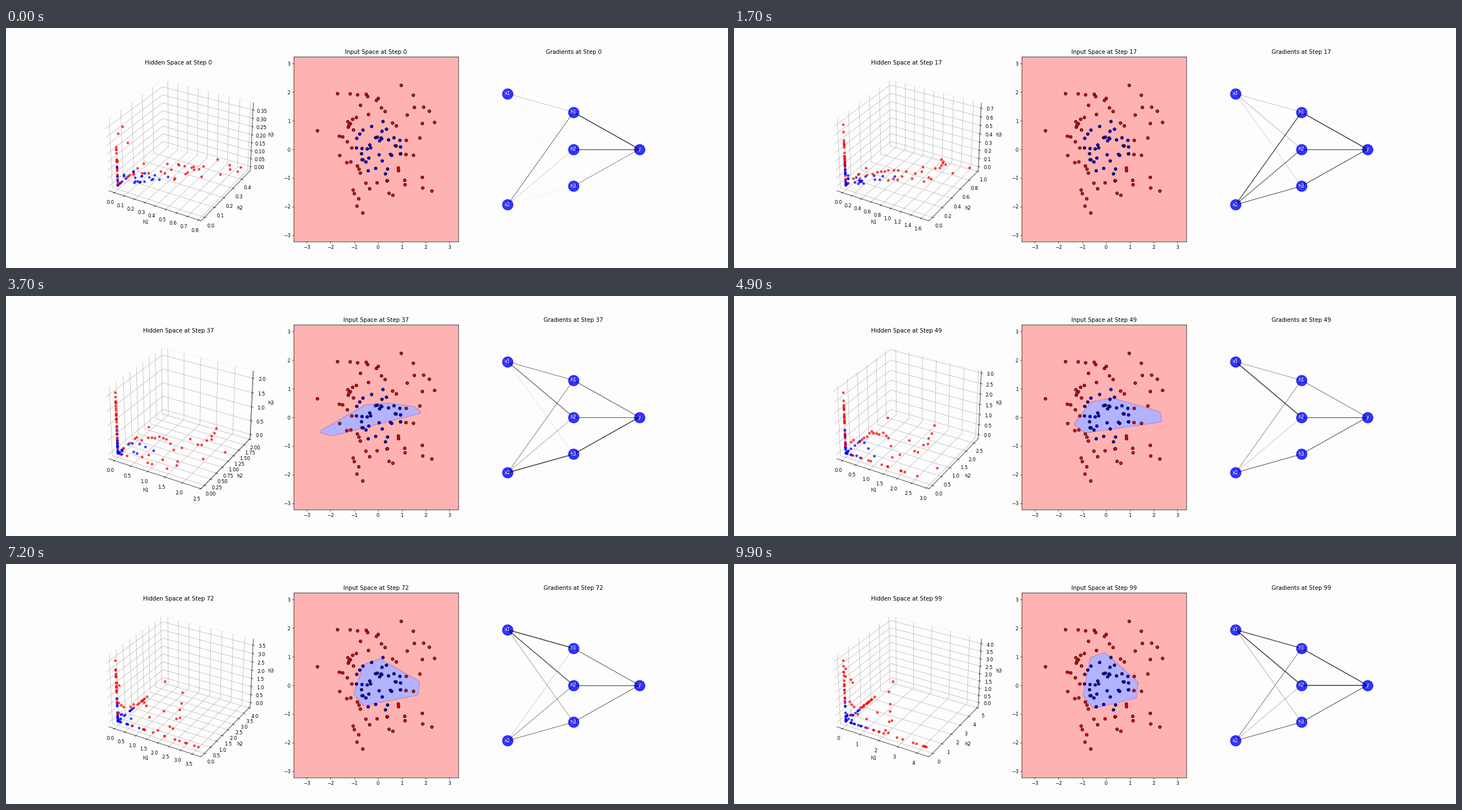
A matplotlib script for the animation above (10000 ms loop, 1280 px wide and 427 px high).

```python
import numpy as np
import matplotlib.pyplot as plt
from matplotlib.animation import FuncAnimation

FRAMES = 100
STEPS_PER_FRAME = 10
RATE = 0.1
DPI = 61
BACK = "#fdfdfd"


def make_data(count=100):
    np.random.seed(0)
    points = np.random.randn(count, 2)
    outer = (points ** 2).sum(axis=1, keepdims=True) > 1
    return points, outer.astype(float)


def forward(points, params):
    w1, b1, w2, b2 = params
    hidden = np.maximum(points @ w1 + b1, 0)
    prob = 1 / (1 + np.exp(-(hidden @ w2 + b2)))
    return hidden, prob


def gradients(points, target, params):
    hidden, prob = forward(points, params)
    d_out = (prob - target) / len(points)
    d_hid = (d_out @ params[2].T) * (hidden > 0)
    return [points.T @ d_hid, d_hid.sum(axis=0),
            hidden.T @ d_out, d_out.sum(axis=0)]


def train(points, target):
    """Return (params, gradients) of a 2-3-1 ReLU network for every frame."""
    np.random.seed(0)
    params = [np.random.randn(2, 3) * 0.1, np.zeros(3),
              np.random.randn(3, 1) * 0.1, np.zeros(1)]
    history = []
    # one extra block of steps comes before the first picture
    for _ in range(FRAMES + 1):
        for _ in range(STEPS_PER_FRAME):
            grads = gradients(points, target, params)
            params = [p - RATE * g for p, g in zip(params, grads)]
        history.append((params, grads))
    return history[1:]


X, Y = make_data()
labels = Y.ravel()
history = train(X, Y)

lo, hi = X.min(axis=0) - 1, X.max(axis=0) + 1
gx, gy = np.meshgrid(np.linspace(lo[0], hi[0], 100),
                     np.linspace(lo[1], hi[1], 100))
grid = np.column_stack([gx.ravel(), gy.ravel()])

fig = plt.figure(figsize=(1280 / DPI, 427 / DPI), dpi=DPI, facecolor=BACK)
ax_hidden = fig.add_subplot(131, projection="3d", facecolor=BACK)
ax_input = fig.add_subplot(132)
ax_net = fig.add_subplot(133)

# input space
ax_input.scatter(X[:, 0], X[:, 1], c=labels, cmap="bwr", edgecolors="k")
ax_input.set_xlim(lo[0], hi[0])
ax_input.set_ylim(lo[1], hi[1])
regions = []

# network graph
inputs = [(0.1, 0.8), (0.1, 0.2)]
hiddens = [(0.5, 0.7), (0.5, 0.5), (0.5, 0.3)]
output = (0.9, 0.5)
ax_net.set_xlim(0, 1)
ax_net.set_ylim(0, 1)
ax_net.axis("off")
nodes = inputs + hiddens + [output]
for (nx, ny), name in zip(nodes, ["x1", "x2", "h1", "h2", "h3", "y"]):
    ax_net.scatter(nx, ny, s=500, color="blue", alpha=0.8)
    ax_net.text(nx, ny, name, color="white", ha="center", va="center")


def link(a, b):
    return ax_net.plot([a[0], b[0]], [a[1], b[1]], color="k", alpha=0.7)[0]


edges = [link(a, b) for a in inputs for b in hiddens]
edges += [link(h, output) for h in hiddens]


def draw_hidden(step, params):
    hidden, _ = forward(X, params)
    ax_hidden.clear()
    for axis in (ax_hidden.xaxis, ax_hidden.yaxis, ax_hidden.zaxis):
        axis.pane.set_facecolor(BACK)
    ax_hidden.scatter(hidden[:, 0], hidden[:, 1], hidden[:, 2],
                      c=labels, cmap="bwr", alpha=0.7)
    ax_hidden.set_xlabel("h1")
    ax_hidden.set_ylabel("h2")
    ax_hidden.set_zlabel("h3")
    ax_hidden.set_title(f"Hidden Space at Step {step}")


def draw_input(step, params):
    while regions:
        regions.pop().remove()
    _, prob = forward(grid, params)
    regions.append(ax_input.contourf(gx, gy, prob.reshape(gx.shape),
                                     levels=[0, 0.5, 1], zorder=0,
                                     colors=["blue", "red"], alpha=0.3))
    ax_input.set_title(f"Input Space at Step {step}")


def draw_net(step, grads):
    size = np.abs(np.concatenate([grads[0].ravel(), grads[2].ravel()]))
    for edge, width in zip(edges, 2 * size / size.max()):
        edge.set_linewidth(width)
    ax_net.set_title(f"Gradients at Step {step}")


def update(step):
    params, grads = history[step]
    draw_hidden(step, params)
    draw_input(step, params)
    draw_net(step, grads)
    return []


anim = FuncAnimation(fig, update, frames=FRAMES, interval=100, repeat=True,
                     repeat_delay=0, blit=False, cache_frame_data=False)
plt.show()
```
